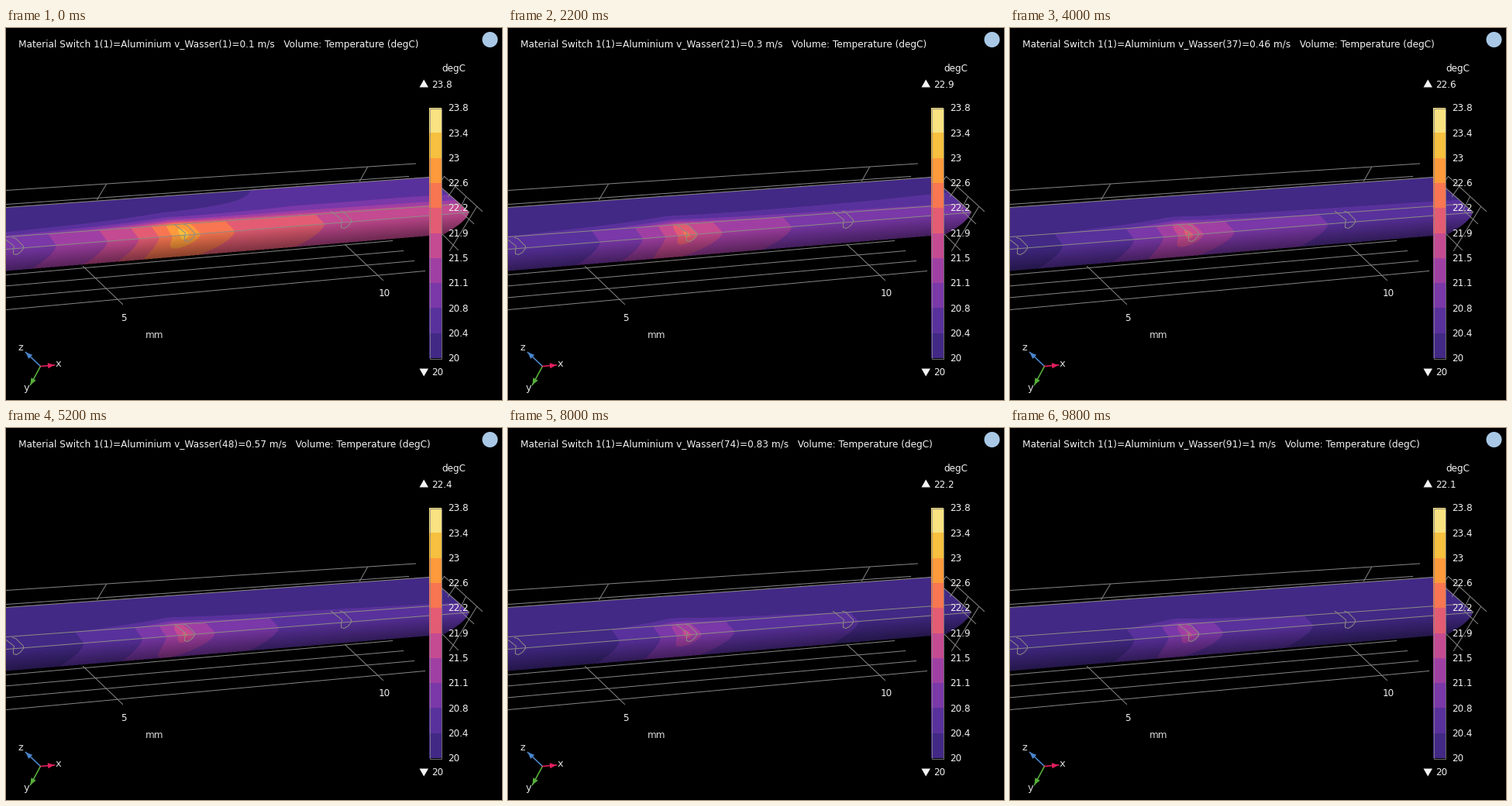
A matplotlib script that plays this animation: 640x480 px, repeating every 10000 ms.

```python
import numpy as np
import matplotlib.pyplot as plt
from matplotlib.animation import FuncAnimation
from matplotlib.colors import to_rgb
from matplotlib.patches import Circle, Polygon, Rectangle

W, H, DPI = 640, 480, 100
FRAMES, INTERVAL = 50, 200
PX = 72 / DPI
STEP = 0.375            # degC per colour band
GRAY, EDGE, TEXT = "#858585", "#8c8a85", "#f2f2f2"

PALETTE = np.array([to_rgb(c) for c in (
    "#422985", "#59319c", "#7a38a8", "#a03fa3", "#c44a91",
    "#e35c73", "#f87651", "#fd9a3c", "#f7c03e", "#f9e280")])

# Pixel grid over the body, two samples per pixel each way
TOP, BOTTOM, SS = 186, 320, 2
gx, gy = np.meshgrid((np.arange(W * SS) + 0.5) / SS,
                     TOP + (np.arange((BOTTOM - TOP) * SS) + 0.5) / SS)


def edge(left, x1, y1):
    return left + 0.5 + (y1 - left) * gx / x1


back = edge(231, 546, 192)
upper = edge(269, 585, 226.5)
lower = edge(285, 597, 237.5)
under = edge(313, 565, 266)

face = np.clip((gy - back) / (upper - back), 0, 1)
strip = np.clip((gy - upper) / (lower - upper), 0, 1)
curve = np.clip((gy - lower) / (under - lower), 0, 1)

# Position along the axis, measured on the lower edge line
axial = gx + 40 * (1 - face) + 11 * (1 - strip) + 33 * curve ** 1.7
inside = (gy >= back) & (gy <= under) & (axial <= 597)
shade = np.where(curve > 0, 0.95 - 0.4 * curve, 1)
shade = (shade * inside)[..., None]

along = axial - 233
dist = np.hypot(along, 10 * (1 - strip) + 30 * curve)
ahead = 0.5 + 0.5 * along / np.maximum(dist, 1e-6)
growth = np.clip((axial - 230) / 316, 0, 1)


def decay(length, power):
    return np.exp(-(dist / length) ** power)


def body(flow):
    """Colour image of the body; flow is the speed over its first value."""
    up = decay(120 / (1 + 0.38 * (flow - 1)), 0.55)
    down = decay(630 * flow ** -1.2, 0.29 * flow ** 0.13)
    temp = 10 * flow ** -0.255 * ((1 - ahead) * up + ahead * down)
    # Water warms downstream and meets the wall in a thin layer
    water = np.minimum((axial / 375) ** 2 * flow ** -1.15, 1.1)
    layer = 0.18 + 0.1 * growth
    wet = water + (temp - water) * np.exp((face - 1) / layer)
    wet = water + (temp - water) * np.exp(-(1 - face) / layer)
    temp = np.where(face < 1, wet, temp)
    rgb = PALETTE[np.clip(temp, 0, 9).astype(int)] * shade
    return rgb.reshape(BOTTOM - TOP, SS, W, SS, 3).mean(axis=(1, 3))


fig = plt.figure(figsize=(W / DPI, H / DPI), dpi=DPI, facecolor="black")
ax = fig.add_axes([0, 0, 1, 1])


def line(*pts, color=GRAY, lw=1, z=2):
    xs, ys = np.transpose(pts) + 0.5
    ax.plot(xs, ys, color=color, lw=lw * PX, zorder=z)


def label(x, y, s, size=12, color=TEXT, ha="left"):
    return ax.text(x, y, s, fontsize=size * PX, color=color, ha=ha,
                   va="baseline", family="DejaVu Sans", zorder=6)


def shape(pts, color):
    ax.add_patch(Polygon(np.array(pts) + 0.5, fc=color, ec="none", zorder=5))


image = ax.imshow(body(1), extent=(0, W, BOTTOM, TOP), aspect="auto",
                  interpolation="nearest", zorder=1)
ax.set_xlim(0, W)
ax.set_ylim(H, 0)
ax.axis("off")

# Grid box around the body
for i in range(4):
    line((0, 318 + 14 * i + i * i / 3), (498 + 14 * i, 274 + 13 * i))
for a, b in [((0, 209), (528, 174.5)), ((0, 227), (519, 191)),
             ((129, 201), (117, 221)), ((466, 179), (456, 197)),
             ((99, 307), (150, 356)), ((437, 279), (486, 325)),
             ((565, 191), (614, 236)), ((607, 230), (572, 287)),
             ((593, 217), (584, 235)), ((579, 204), (570, 217)),
             ((565, 191), (560, 198)), ((563, 266), (583, 286)),
             ((585, 235), (603, 252))]:
    line(a, b)

# Body edges and the small loops on the strip
for a, b in [((0, 231), (546, 192)), ((0, 269), (585, 226.5)),
             ((0, 285), (597, 237.5)), ((546, 192), (597, 237))]:
    line(a, b, color=EDGE)
LOOP = np.array([(-18, -13), (-4, -2), (-5, 3), (-5, 8), (-1, 9), (4, 6),
                 (8, 1), (8, -2), (4, -6), (-2, -12), (-6, -13)])
for center in [(14, 283), (235, 266), (437, 249)]:
    line(*(LOOP + center), color=EDGE)

label(151.5, 378, "5", ha="center")
label(488.5, 346, "10", ha="center")
label(192, 400, "mm", color="#d8d8d8", ha="center")

# Colour bar
BAR_X, BAR_TOP, BAND = 546, 103, 32.3
for i, color in enumerate(PALETTE[::-1]):
    ax.add_patch(Rectangle((BAR_X, BAR_TOP + i * BAND), 15.5, BAND + 0.3,
                           fc=color, ec="none", zorder=4))
ax.add_patch(Rectangle((BAR_X + 0.5, BAR_TOP + 0.5), 15, 10 * BAND,
                       fill=False, ec=GRAY, lw=0.8 * PX, zorder=5))
for i in range(11):
    value = round(20 + (10 - i) * STEP, 1)
    label(570.4, BAR_TOP + i * BAND + 4.2, f"{value:g}")
label(562.6, 56, "degC")
for base, tip in [(76, 66), (439, 449)]:
    shape([(533, base), (544.5, base), (538.7, tip)], "#f4f4f4")
label(549.5, 448, "20")

# Axis triad
ORIGIN = np.array([44, 436])
for tip, color in [((25, 418), "#4a86cc"), ((31, 460), "#58b03c"),
                   ((62, 434.5), "#e0205c")]:
    line(ORIGIN, tip, color=color, lw=1.6, z=4)
    unit = (tip - ORIGIN) / np.hypot(*(tip - ORIGIN))
    side = 3.6 * np.array([-unit[1], unit[0]])
    neck = tip - 8.5 * unit
    shape([tip, neck + side, neck - side], color)
for x, y, s in [(64, 437, "x"), (23, 468, "y"), (16, 416, "z")]:
    label(x, y, s, 13, "#dddddd")

ax.add_patch(Circle((624.5, 15), 10, fc="#a9c8e6", ec="none", zorder=5))

title = label(16, 25.5, "", 12.08)
peak = label(549.5, 77, "")


def update(k):
    n = 1 + 90 * k // (FRAMES - 1)
    v = round(0.09 + 0.01 * n, 2)
    flow = v / 0.1
    image.set_data(body(flow))
    title.set_text(f"Material Switch 1(1)=Aluminium v_Wasser({n})={v:g} m/s"
                   "   Volume: Temperature (degC)")
    peak.set_text(f"{round(20 + 3.78 * flow ** -0.255, 1):g}")
    return image, title, peak


anim = FuncAnimation(fig, update, frames=FRAMES, interval=INTERVAL,
                     repeat=True, repeat_delay=0)
plt.show()
```
